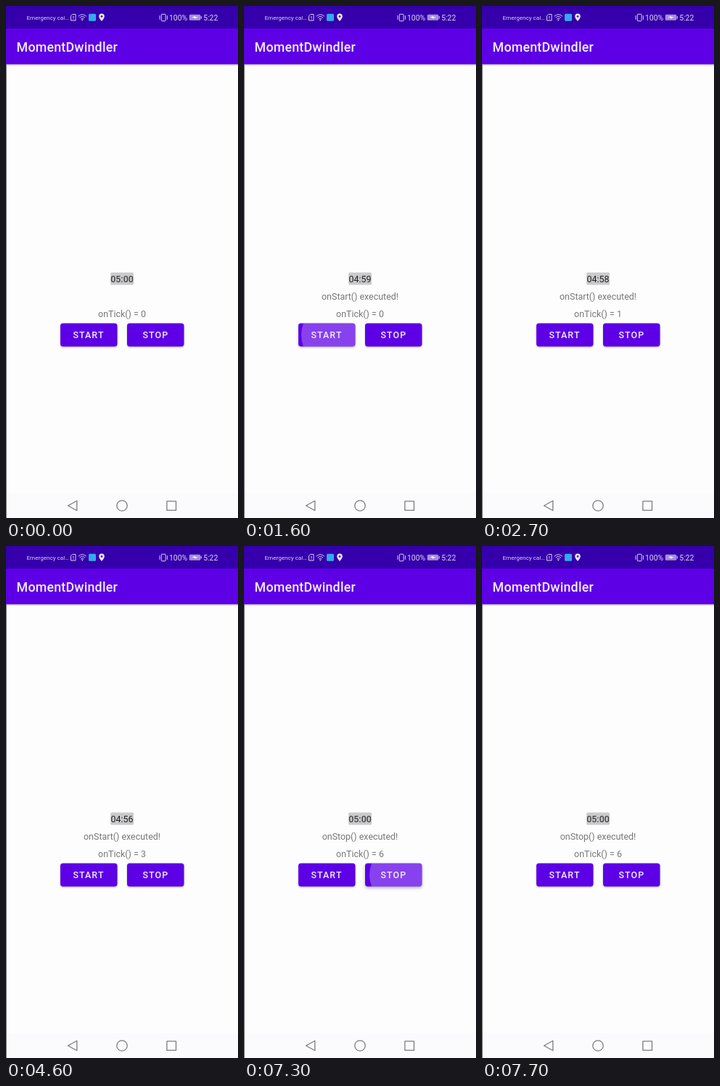
An HTML page that plays this animation: 320 px wide and 706 px high, repeating every 8 s.

```html
<!DOCTYPE html>
<html lang="en">
<head>
<meta charset="utf-8">
<title>Timer</title>
<style>
  html, body { margin: 0; width: 100%; height: 100%; overflow: hidden; background: #fdfdfd; }
  svg { display: block; width: 320px; height: 706px; font-family: Roboto, sans-serif; }
  .title { font-size: 17.8px; font-weight: 500; letter-spacing: .0125em; fill: #f5f0fd; }
  .carrier { font-size: 8.1px; fill: #d9cff0; }
  .status { font-size: 10.4px; fill: #ded5f2; }
  .body { font-size: 12.44px; fill: #777; text-anchor: middle; }
  .label { font-size: 12.44px; font-weight: 500; letter-spacing: .0893em; fill: #f3ecfd; }
  .clock { fill: #222; }
  .clock.idle { fill: #444; font-weight: 500; }
  .line { fill: none; stroke: #d9cff0; stroke-width: 1; }
  .nav { fill: none; stroke: #7c7c7c; stroke-width: 1.3; stroke-linejoin: round; }
</style>
</head>
<body>
<svg viewBox="0 0 320 706">
  <defs>
    <linearGradient id="shade" x2="0" y2="1">
      <stop stop-color="#000" stop-opacity=".28"/>
      <stop offset="1" stop-color="#000" stop-opacity="0"/>
    </linearGradient>
    <clipPath id="startClip"><rect x="75" y="437.4" width="78.5" height="32" rx="3.6"/></clipPath>
    <clipPath id="stopClip"><rect x="167" y="437.4" width="78.5" height="32" rx="3.6"/></clipPath>
  </defs>

  <rect width="320" height="706" fill="#fdfdfd"/>
  <rect y="672" width="320" height="34" fill="#fbfafc"/>
  <rect y="80" width="320" height="3" fill="url(#shade)"/>
  <rect y="80" width="1" height="626" fill="#858585"/>
  <rect y="30" width="320" height="50.3" fill="#5d00e6"/>
  <rect width="320" height="31" fill="#3500ab"/>

  <!-- status bar -->
  <text class="carrier" x="28.5" y="18.7">Emergency cal…</text>
  <path class="line" d="M91.6 11.5H96V20H89.5V13.6Z"/>
  <path class="line" d="M92.8 13.8V16.8M92.8 17.6V18.6"/>
  <path class="line" d="M99.8 14.2Q105.300 9.200 110.800 14.200M101.600 16.200Q105.300 12.900 109 16.200M103.300 18Q105.300 16.200 107.300 18"/>
  <circle cx="105.3" cy="19.4" r=".9" fill="#d9cff0"/>
  <rect x="114" y="10.800" width="10" height="10" rx="1.500" fill="#35a9ee"/>
  <path d="M132 21C129.500 17.800 128.200 16.200 128.200 14.400A3.800 3.800 0 0 1 135.800 14.400C135.800 16.200 134.500 17.800 132 21Z" fill="#ece6f8"/>
  <circle cx="132" cy="14.400" r="1.300" fill="#3500ab"/>
  <rect class="line" x="214.300" y="11.300" width="5.800" height="9.400" rx=".8"/>
  <path class="line" d="M212 13.200V18.800M222.400 13.200V18.800"/>
  <text class="status" x="225" y="19.600">100%</text>
  <rect x="252.800" y="11.800" width="15.400" height="8" rx="1.500" fill="#a58fd8"/>
  <rect x="268.600" y="14" width="1.300" height="3.600" fill="#c5b6e6"/>
  <path d="M256.500 15.600L261 14V15.300H264.800L260.200 17.600V16.200Z" fill="#fff"/>
  <text class="status" x="272.200" y="19.600">5:22</text>

  <text class="title" x="14.600" y="62.600">MomentDwindler</text>

  <!-- timer -->
  <rect x="144.200" y="367.600" width="31.800" height="17" rx="1.500" fill="#cac9cb"/>
  <text class="body clock" id="clock" x="160" y="381.300">05:00</text>
  <text class="body" id="state" x="160" y="405"></text>
  <text class="body" id="ticks" x="160" y="429"></text>

  <g id="start">
    <rect class="face" x="75" y="437.400" width="78.500" height="32" rx="3.600" fill="#5d00e6"/>
    <g clip-path="url(#startClip)"><circle class="ripple" cx="125" cy="453.500" fill="#fff"/></g>
    <text class="label" x="92.400" y="457.900">START</text>
  </g>
  <g id="stop">
    <rect class="face" x="167" y="437.400" width="78.500" height="32" rx="3.600" fill="#5d00e6"/>
    <g clip-path="url(#stopClip)"><circle class="ripple" cx="214" cy="453.500" fill="#fff"/></g>
    <text class="label" x="188.500" y="457.900">STOP</text>
  </g>

  <!-- navigation -->
  <path class="nav" d="M85.500 689L97.800 682.200V695.800Z"/>
  <circle class="nav" cx="160" cy="689" r="7.200"/>
  <rect class="nav" x="221.900" y="682.800" width="12.600" height="12.600"/>
</svg>
<script>
  const LOOP = 8000, STEP = 100;
  const STARTED = 1600, STOPPED = 7300;
  const $ = id => document.getElementById(id);

  // Per step: ripple radius, ripple strength, lift of the button
  const release = [[90, 1, 1], [90, .6, .6], [90, .3, .25]];
  const presses = [
    { id: 'start', at: 1600, steps: [[46, 1, .4], ...release] },
    { id: 'stop', at: 7200, steps: [[18, .6, .3], [41, 1, .9], ...release] }
  ];

  function drawButton({ id, at, steps }, t) {
    const [radius, strength, lift] = steps[(t - at) / STEP] || [0, 0, 0];
    const ripple = $(id).querySelector('.ripple');
    ripple.setAttribute('r', radius);
    ripple.setAttribute('fill-opacity', .26 * strength);
    $(id).querySelector('.face').style.filter =
      `drop-shadow(0 ${1 + 1.5 * lift}px ${1 + lift}px rgba(0,0,0,.3))`;
  }

  function setText(id, text) {
    if ($(id).textContent !== text) $(id).textContent = text;
  }

  function draw(now) {
    const t = Math.floor(now % LOOP / STEP) * STEP;
    const running = t >= STARTED && t < STOPPED;
    const count = running ? Math.floor((t - STARTED) / 1000) : t < STARTED ? 0 : 6;

    setText('clock', running ? `04:${59 - count}` : '05:00');
    $('clock').classList.toggle('idle', !running);
    setText('state', t < STARTED ? '' : running ? 'onStart() executed!' : 'onStop() executed!');
    setText('ticks', `onTick() = ${count}`);
    presses.forEach(p => drawButton(p, t));
  }

  function frame() {
    draw(performance.now());
    requestAnimationFrame(frame);
  }
  frame();
</script>
</body>
</html>
```
